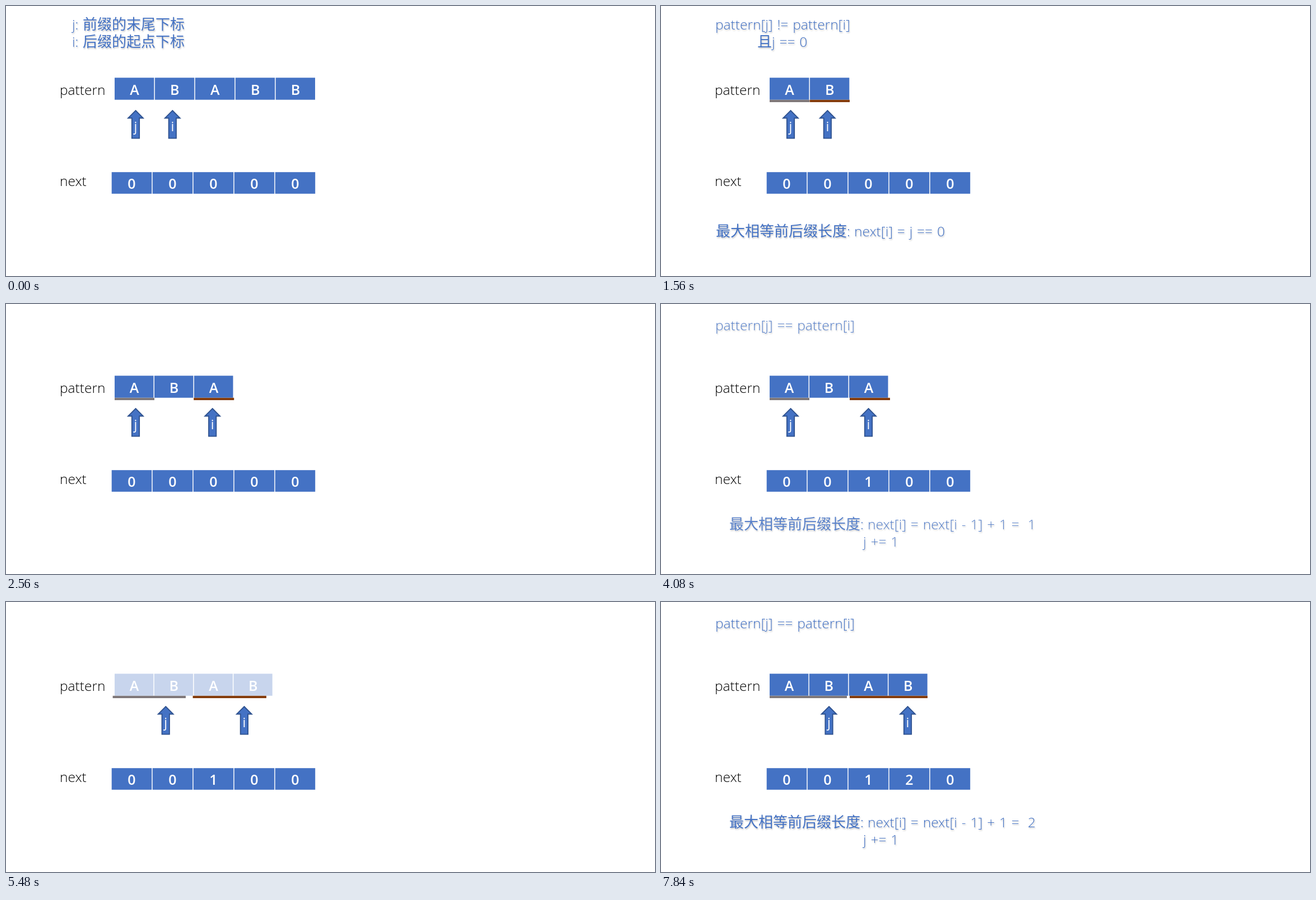
Write an HTML page that moves like this. It is 1159 px wide and 483 px high and loops after 8 s.

```html
<!DOCTYPE html>
<html lang="zh-CN">
<head>
<meta charset="utf-8">
<style>
html, body { margin: 0; width: 100%; height: 100%; overflow: hidden; background: #fff; }
svg { display: block; font: 300 24.5px "Open Sans", "Noto Sans", sans-serif; }
.note { fill: #4472c4; word-spacing: 1.5px; filter: drop-shadow(1px 2px 1px rgba(0, 0, 0, .22)); }
.cjk { font: 350 26px "Noto Sans CJK SC", "Noto Sans CJK", sans-serif; }
.cell { fill: #4472c4; }
.bold { font-weight: 600; font-size: 25px; fill: #fff; text-anchor: middle; }
.arrow path { fill: #4472c4; stroke: #2f528f; stroke-width: 1.8; }
.arrow text { font-weight: 400; font-size: 23px; fill: #fff; text-anchor: middle; }
</style>
</head>
<body>
<svg id="stage" width="1159" height="483" viewBox="0 0 1159 483"></svg>
<script>
const stage = document.getElementById('stage');

function add(parent, tag, attrs = {}, text = '') {
  const el = document.createElementNS('http://www.w3.org/2000/svg', tag);
  for (const k in attrs) el.setAttribute(k, attrs[k]);
  el.textContent = text;
  parent.append(el);
  return el;
}
const write = (parent, x, y, text, cls = '') => add(parent, 'text', { x, y, class: cls }, text);
const clamp = x => Math.min(1, Math.max(0, x));
const mix = (a, b, p) => a + (b - a) * p;

// Groups shown only in some of the scenes 0 to 5
const fading = [];
function fade(scenes, cls = '', cross = false) {
  const el = add(stage, 'g', { class: cls });
  fading.push({ el, scenes, cross });
  return el;
}

function note(scenes, ...runs) {
  const g = fade(scenes, 'note');
  runs.forEach(r => write(g, ...r));
}

function cells(parent, x, y, height, pitch, count) {
  for (let k = 0; k < count; k++)
    add(parent, 'rect', { x: x + k * pitch, y, width: pitch - 1.5, height, class: 'cell' });
}

function pattern(scenes, letters, pitch) {
  const g = fade(scenes);
  cells(g, 194, 128.3, 39.4, pitch, letters.length);
  [...letters].forEach((c, k) => write(g, 193.5 + (k + .5) * pitch, 158.5, c, 'bold'));
}

function arrow(letter) {
  const g = add(stage, 'g', { class: 'arrow' });
  add(g, 'path', { d: 'M0 187L13.5 200.5H6.7V236.7H-6.7V200.5H-13.5Z' });
  write(g, 0, 224, letter);
  return g;
}

write(stage, 96, 159, 'pattern');
write(stage, 96, 322, 'next');

const length = '最大相等前后缀长度';
note([0], [118, 42, 'j:'], [137, 42, '前缀的末尾下标', 'cjk'],
  [118, 73, 'i:'], [137, 73, '后缀的起点下标', 'cjk']);
note([1], [97, 42, 'pattern[j] != pattern[i]'], [172, 73, '且', 'cjk'], [198, 73, 'j == 0'],
  [98, 412, length, 'cjk'], [332, 412, ':'], [345, 412, 'next[i] = j == 0']);
note([3, 5], [97, 47, 'pattern[j] == pattern[i]'], [122, 403, length, 'cjk'], [356, 403, ':'],
  [369, 403, 'next[i] = next[i - 1] + 1 ='], [361, 434, 'j += 1']);
note([3], [655, 403, '1']);
note([5], [655, 403, '2']);

pattern([0], 'ABABB', 71.9);
pattern([1], 'AB', 71.9);
pattern([2, 3], 'ABA', 71);
pattern([4, 5], 'ABAB', 70.8);

cells(stage, 188.7, 297.2, 38.6, 73, 5);
const digit = (k, text, scenes) => write(fade(scenes, '', true), 224.3 + 73 * k, 327, text, 'bold');
[0, 1, 4].forEach(k => digit(k, '0', [0, 1, 2, 3, 4, 5]));
digit(2, '0', [0, 1, 2]);
digit(2, '1', [3, 4, 5]);
digit(3, '0', [0, 1, 2, 3, 4]);
digit(3, '2', [5]);

const lines = fade([1, 2, 3, 4, 5]);
const bar = fill => add(lines, 'rect', { y: 167.8, height: 4.2, fill });
const grey = bar('#7f7879'), brown = bar('#843c0c');
const arrowJ = arrow('j'), arrowI = arrow('i');

// Per scene: arrow centres, then left and right ends of both underlines
const poses = [
  [231.5, 297.3, 194, 265, 265.5, 337],
  [231.5, 297.3, 194, 265, 265.5, 337],
  [231.5, 370.5, 194, 265, 337, 409],
  [231.5, 370.5, 194, 265, 337, 409],
  [300, 440.5, 194, 332, 337, 476],
  [300, 440.5, 194, 332, 337, 476]
];
const moves = [[480, 1160], [2080, 2680], [3640, 4240], [5240, 5760], [6760, 7280]];
const lead = 40;

function opacity({ scenes, cross }, n, p) {
  const before = scenes.includes(n), after = scenes.includes(n + 1);
  if (before === after) return +before;
  const shown = cross ? clamp((p - .2) / .45) : clamp((p - .38) / .42);
  if (after) return shown;
  return cross ? 1 - shown : clamp(1 - p / .4);
}

// The centre follows the arrows, the length runs ahead of it
function stretch(el, a, b, k, p) {
  const centre = mix(a[k] + a[k + 1], b[k] + b[k + 1], p) / 2;
  const width = mix(a[k + 1] - a[k], b[k + 1] - b[k], Math.sqrt(p));
  el.setAttribute('x', centre - width / 2);
  el.setAttribute('width', width);
}

function draw(t) {
  let n = 0, p = 0;
  moves.forEach(([start, end], k) => {
    if (t >= start) {
      n = k;
      p = clamp((t - start + lead) / (end - start + lead));
    }
  });
  const eased = 1 - (1 - p) ** 2.2;
  const a = poses[n], b = poses[n + 1];
  fading.forEach(f => f.el.setAttribute('opacity', opacity(f, n, p)));
  arrowJ.setAttribute('transform', `translate(${mix(a[0], b[0], eased)})`);
  arrowI.setAttribute('transform', `translate(${mix(a[1], b[1], eased)})`);
  stretch(grey, a, b, 2, eased);
  stretch(brown, a, b, 4, eased);
}

const began = performance.now();
function tick() {
  draw((performance.now() - began) % 8000);
  requestAnimationFrame(tick);
}
tick();
</script>
</body>
</html>
```
